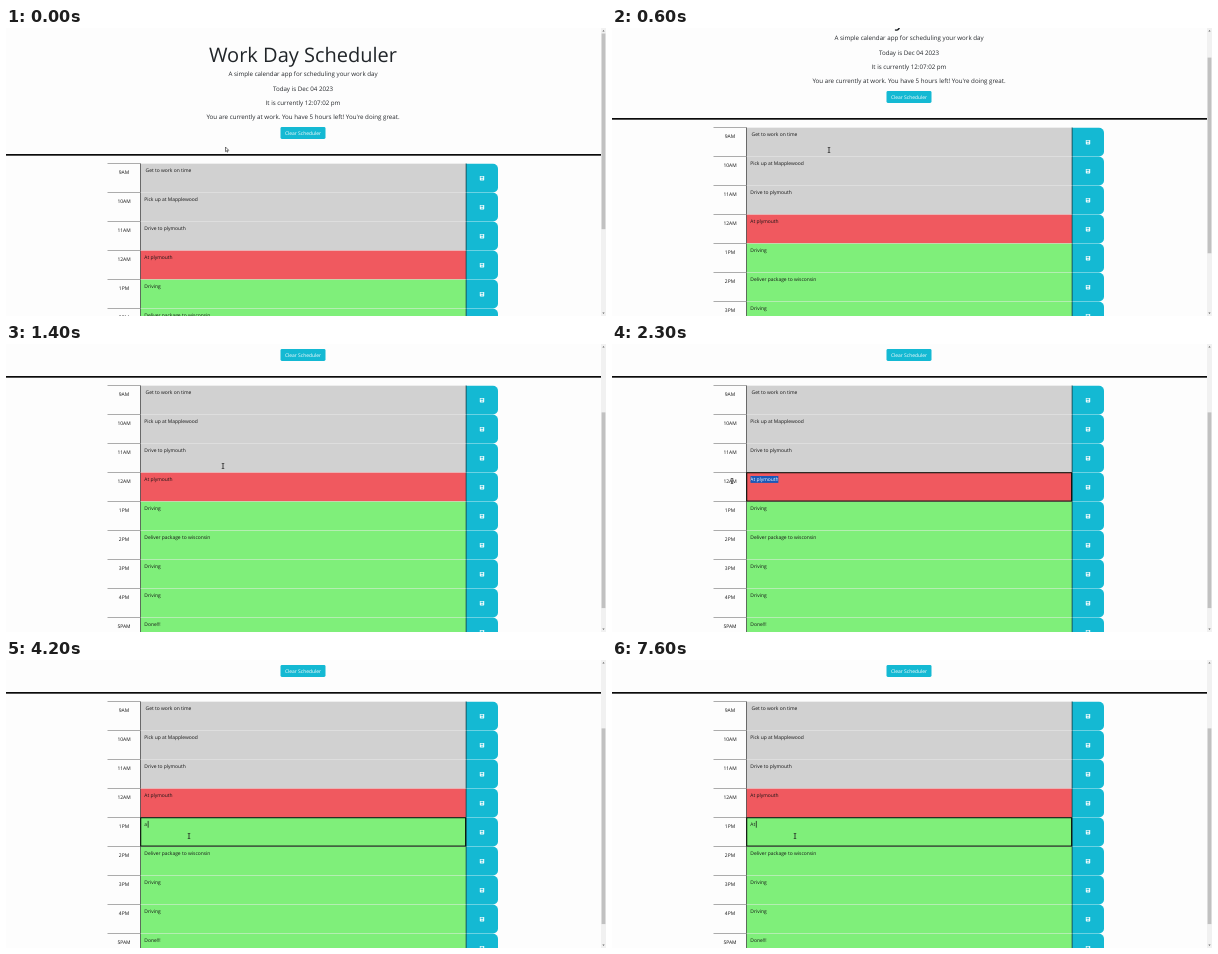
An HTML page with a canvas for the animation above (8 s loop, 600 by 288 pixels).

```html
<!DOCTYPE html>
<html lang="en">
<head>
<meta charset="utf-8">
<title>Work Day Scheduler</title>
<style>
html, body { margin: 0; width: 100%; height: 100%; overflow: hidden; background: #fff; }
canvas { display: block; }
</style>
</head>
<body>
<canvas id="stage" width="600" height="288"></canvas>
<script>
const ctx = document.getElementById('stage').getContext('2d');
const LOOP = 8000, STEP = 100;
const MID = 297, TOP = 135.5, ROW = 29, PAGE = 414;
const LEFT = 101.5, FIELD = 134.5, SAVE = 460, RIGHT = 492, TEXT_X = 138.3;
const BODY = 4.95, LEAD = 6.2;
const GREY = '#d1d1d1', RED = '#f0595f', GREEN = '#7fef7a', TEAL = '#14b9d3';

const rows = [
  ['9AM', ' Get to work on time', GREY],
  ['10AM', 'Pick up at Mapplewood', GREY],
  ['11AM', 'Drive to plymouth', GREY],
  ['12AM', 'At plymouth', RED],
  ['1PM', 'Driving', GREEN],
  ['2PM', 'Deliver package to wisconsin', GREEN],
  ['3PM', 'Driving', GREEN],
  ['4PM', 'Driving', GREEN],
  ['5PAM', 'Done!!!', GREEN]
];

// Each key: time, then values
const scrollKeys = [[400, 0], [500, 5], [600, 36], [700, 92], [800, 121], [900, 128],
  [1000, 126], [1100, 110], [1200, 97], [1300, 94]];
const mouseKeys = [[0, 219.5, 119], [300, 217, 122], [1400, 217, 122], [1700, 169, 136],
  [2200, 121, 137], [2300, 120, 137], [2400, 120, 137], [2800, 158, 165],
  [3300, 136, 165], [4000, 183, 176]];
// Time, typed text, caret shown
const typing = [[4200, 'a', true], [4600, 'a', false], [5000, 'a', true], [5200, 'a', false],
  [5500, 'at', true], [5800, 'a', true], [6000, 'a', false], [6200, 'A', true],
  [6800, 'A', false], [7300, 'A', true], [7600, 'At', true]];

function track(keys, t) {
  const next = keys.findIndex(k => k[0] > t);
  if (next === 0) return keys[0].slice(1);
  if (next < 0) return keys[keys.length - 1].slice(1);
  const a = keys[next - 1], b = keys[next], p = (t - a[0]) / (b[0] - a[0]);
  return a.slice(1).map((v, i) => v + (b[i + 1] - v) * p);
}

function box(x, y, w, h, color) {
  ctx.fillStyle = color;
  ctx.fillRect(x, y, w, h);
}

function round(x, y, w, h, r, color) {
  ctx.fillStyle = color;
  ctx.beginPath();
  ctx.roundRect(x, y, w, h, r);
  ctx.fill();
}

function poly(points, color) {
  ctx.beginPath();
  points.forEach(([x, y]) => ctx.lineTo(x, y));
  ctx.closePath();
  ctx.fillStyle = color;
  ctx.fill();
}

function setFont(size) {
  ctx.font = `${size}px "Open Sans", sans-serif`;
  ctx.textRendering = 'geometricPrecision';
}

function label(str, x, y, size, color, align = 'center') {
  setFont(size);
  ctx.textAlign = align;
  ctx.fillStyle = color;
  ctx.fillText(str, x, y);
}

function textWidth(str) {
  setFont(BODY);
  return ctx.measureText(str).width;
}

function drawHeader() {
  label('Work Day Scheduler', MID, 34.2, 20, '#212529');
  ['A simple calendar app for scheduling your work day',
    'Today is Dec 04 2023',
    'It is currently 12:07:02 pm',
    "You are currently at work. You have 5 hours left! You're doing great."
  ].forEach((line, i) => label(line, MID, 48.2 + i * 14.35, LEAD, '#25282c'));
  round(274.5, 99, 45, 12, 1.4, TEAL);
  label('Clear Scheduler', MID, 106.8, BODY, '#fff');
  box(0, 126, 595, 1.7, '#0b0b0b');
}

function drawDisk(x, y) {
  round(x - 2.2, y - 2.1, 4.4, 4.4, 0.6, '#eefafc');
  box(x - 1.4, y - 1.4, 2.5, 1.1, TEAL);
  box(x - 0.6, y + 0.5, 1.2, 1.1, TEAL);
}

function drawRow([hour, text, color], i) {
  const y = TOP + i * ROW;
  box(LEFT, y - 0.2, FIELD - LEFT, 0.7, '#8a8a8a');
  label(hour, 118, y + 10.6, BODY, '#111');
  box(FIELD, y, SAVE - FIELD, ROW, color);
  box(FIELD, y, SAVE - FIELD, 0.4, 'rgba(255,255,255,.75)');
  box(FIELD, y + ROW - 0.5, SAVE - FIELD, 0.5, 'rgba(0,0,0,.2)');
  box(FIELD - 0.2, y, 0.7, ROW, '#333');
  round(SAVE, y + 0.3, RIGHT - SAVE, ROW - 0.4, [0, 5, 5, 0], TEAL);
  box(SAVE - 0.3, y, 0.8, ROW, '#143c44');
  drawDisk(476, y + 14.6);
  label(text, TEXT_X, y + 8.6, BODY, '#151515', 'left');
}

function drawFocus(i) {
  ctx.strokeStyle = '#0c120c';
  ctx.lineWidth = 1.1;
  ctx.strokeRect(FIELD + 0.2, TOP + i * ROW + 0.2, SAVE - FIELD - 0.6, ROW - 0.6);
}

function drawSelection(i, from) {
  const y = TOP + i * ROW, text = rows[i][1];
  const end = TEXT_X + textWidth(text), x = Math.max(TEXT_X, from);
  if (x >= end) return;
  ctx.save();
  ctx.beginPath();
  ctx.rect(x, y + 3.4, end - x, 7);
  ctx.clip();
  box(x, y + 3.4, end - x, 7, '#1b58b8');
  label(text, TEXT_X, y + 8.6, BODY, '#fff', 'left');
  ctx.restore();
}

function drawScrollbar(scroll) {
  box(595, 0, 5, 288, '#f1f1f1');
  const ratio = 277 / PAGE;
  box(595.6, 5.5 + scroll * ratio, 3.8, 288 * ratio + 3, '#c1c1c1');
  poly([[596.4, 3.4], [597.5, 2], [598.6, 3.4]], '#666');
  poly([[596.4, 284.6], [597.5, 286], [598.6, 284.6]], '#666');
}

function drawArrow(x, y) {
  const shape = [[0, 0], [0, 4.6], [1, 3.7], [1.7, 5.2], [2.4, 4.9], [1.8, 3.4], [3.2, 3.3]];
  poly(shape.map(([dx, dy]) => [x + dx, y + dy]), '#fff');
  ctx.strokeStyle = '#222';
  ctx.lineWidth = 0.6;
  ctx.stroke();
}

function drawBeam(x, y) {
  box(x - 0.4, y - 2.8, 0.8, 5.6, '#222');
  box(x - 1.3, y - 3, 2.6, 0.6, '#222');
  box(x - 1.3, y + 2.4, 2.6, 0.6, '#222');
}

function draw(t) {
  const [scroll] = track(scrollKeys, t);
  const [mx, my] = track(mouseKeys, t);
  const typed = typing.filter(k => k[0] <= t).pop();
  const focus = t < 1700 ? -1 : t < 2800 ? 3 : 4;

  box(0, 0, 600, 288, '#fdfdfd');
  ctx.save();
  ctx.translate(0, -scroll);
  drawHeader();
  rows.forEach(([hour, text, color], i) =>
    drawRow([hour, i === 4 && typed ? typed[1] : text, color], i));
  if (focus >= 0) {
    drawFocus(focus);
    const dragging = t < 2300 || (t >= 2800 && t < 3300);
    if (!typed) drawSelection(focus, dragging ? mx : 0);
  }
  if (typed && typed[2]) {
    box(TEXT_X + textWidth(typed[1]) + 0.7, TOP + 4 * ROW + 3.4, 0.7, 6.8, '#111');
  }
  ctx.restore();

  drawScrollbar(scroll);
  (my < TOP - scroll ? drawArrow : drawBeam)(mx, my);
}

const start = performance.now();
function tick() {
  const t = (performance.now() - start) % LOOP;
  draw(Math.floor(t / STEP) * STEP);
  requestAnimationFrame(tick);
}
tick();
</script>
</body>
</html>
```
